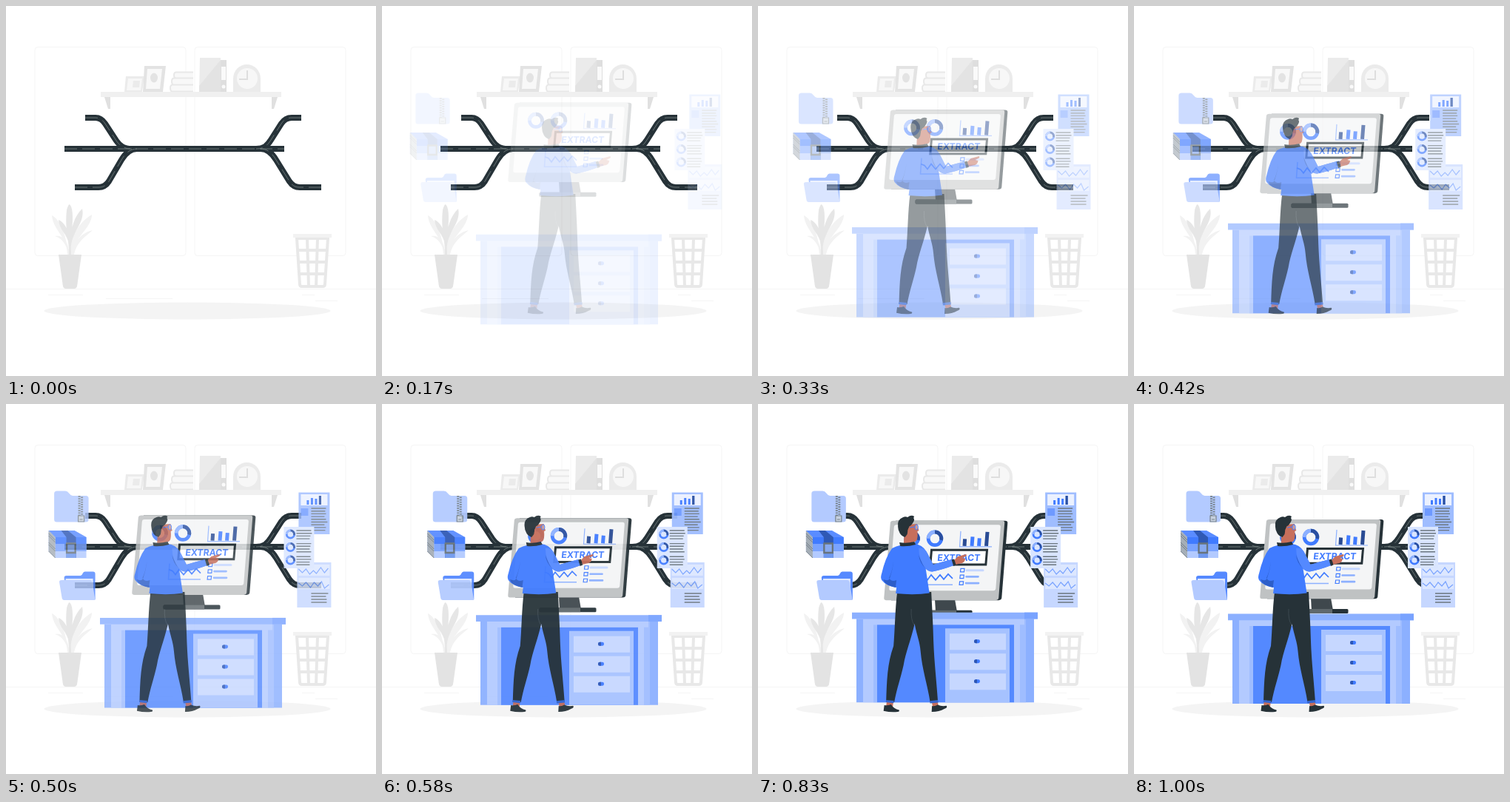
An HTML page for the animation above (1040 ms loop, 500 px wide and 500 px high).

```html
<!DOCTYPE html>
<html lang="en">
<head>
<meta charset="utf-8">
<title>Data extraction</title>
<style>
html, body { margin: 0; width: 100%; height: 100%; overflow: hidden; background: #fff }
svg { display: block; width: 100%; height: 100% }
.line { fill: none; stroke-linecap: butt }
.blue { fill: #407bff }
.dark { fill: #263238 }
.skin { fill: #c76f5b }
.text { fill: none; stroke: #6b767e; stroke-width: 1.4 }
</style>
</head>
<body>
<svg viewBox="0 0 500 500">
<defs>
  <path id="wires" fill="none" d="M79 193H376M107 151h14c5 0 9 2 13 8l15 23c5 7 10 11 21 11M93 245h32c6 0 10-2 14-8l17-29c6-10 12-15 21-15M399 151h-13c-6 0-10 2-14 8l-14 22c-5 8-10 12-20 12M426 245h-29c-6 0-10-2-14-8l-18-29c-6-10-12-15-21-15"/>
  <g id="donut" fill="none" stroke-width="4.6">
    <circle r="8.6" stroke="#407bff"/>
    <path d="M0-8.6A8.6 8.6 0 0 1 8.3 2" stroke="#2a4f9f"/>
    <path d="M-8.6 0A8.6 8.6 0 0 1 0-8.6" stroke="#8cb0ff"/>
  </g>
  <g id="drawer">
    <path d="M259 312h76v22h-76z" fill="#c6d7ff"/>
    <rect x="292" y="320" width="8" height="5" rx="2.3" class="blue"/>
    <path d="M296 320h-1.500a2.500 2.500 0 0 0 0 5h1.500z" fill="#2d56b3"/>
  </g>
</defs>

<!-- Room -->
<g class="line" stroke="#f5f5f5">
  <rect x="39" y="55.5" width="204" height="282" rx="4"/>
  <rect x="255" y="55.5" width="204" height="282" rx="4"/>
  <path d="M0 382.5H500M57 390.5h47M135 395.5h90M400 390.5h17M418 398.5h30"/>
</g>
<g fill="#ebebeb">
  <path d="M162 95h25l-3 21h-24z"/>
  <path d="M165 98h19l-2 16h-19z" fill="#f7f7f7"/>
  <path d="M172 101h9l-1 9h-9z"/>
  <path d="M187 81h29l-4 35h-27z" fill="#e3e3e3"/>
  <path d="M191 85h20l-3 27h-19z" fill="#f8f8f8"/>
  <ellipse cx="200" cy="97" rx="5" ry="6.5" fill="#e3e3e3"/>
  <path d="M253 89.5h-23q-3 0-3 4t3 4h23m0 0h-26q-3 0-3 4.500t3 4.500h26m0 0h-28q-3 0-3 4.500t3 4.500h28" fill="#f8f8f8" stroke="#e8e8e8" stroke-width="2"/>
  <path d="M262 70h28v47h-29z"/>
  <path d="M290 73v44h-29v-9z" fill="#e3e3e3"/>
  <path d="M290 73h8v44h-8z" fill="#dedede"/>
  <path d="M291 82h6v18h-6z" fill="#fafafa"/>
  <circle cx="294" cy="109" r="2.500" fill="#fafafa"/>
  <path d="M307 117V98a18.500 19 0 0 1 37 0v19z"/>
  <circle cx="326" cy="98" r="14" fill="#f7f7f7"/>
  <path d="M326 87v12h-11" class="line" stroke="#dedede" stroke-width="2"/>
  <path d="M128 116h244v7H128z" fill="#f0f0f0"/>
  <path d="M133 123h8v16h-3zM359 123h8l-5 16h-3z" fill="#e0e0e0"/>
</g>
<g fill="#f2f2f2">
  <path d="M83 336C82 310 64 304 62 283c12 6 20 28 22 53zM84 336c-2-14-8-22-18-25 9-2 18 4 20 25zM87 336c-1-25 13-45 29-54 0 18-24 30-27 54zM89 336c2-18 14-30 28-33-7 7-21 14-25 33z"/>
  <path d="M85 336c1-20-6-32-3-60q2-8 4-8 4 4 4 18c0 16-3 28-2 50zM85 322c-2-14-13-19-14-33 8 3 14 14 15 28zM87 320c0-20 6-37 16-46 4 18-12 28-15 50z" fill="#e6e6e6"/>
  <path d="M71 336h31l-6 43q-1 3-4 3H81q-3 0-4-3z" fill="#e3e3e3"/>
  <path d="M393 314h42l-4 62q0 3-3 3h-28q-3 0-3-3zM407 314l2 65M421 314l-2 65M394 330h40M395 346h38M396 362h36" fill="#fff" stroke="#e8e8e8" stroke-width="4"/>
  <path d="M388 308h52v5h-52z"/>
  <ellipse cx="245" cy="412" rx="193.500" ry="11.500" fill="#f4f4f4"/>
</g>

<!-- Cables -->
<use href="#wires" stroke="#263238" stroke-width="8"/>
<use href="#wires" stroke="#84908f" stroke-width=".7" stroke-dasharray="17 7"/>

<!-- Archives -->
<g data-x="-30">
  <path d="M70.500 121q0-3.500 4-3.500h11q3 0 5 3t5 3.500h18q3.500 0 3.500 3.500v28.500q0 3.500-3.500 3.500H74q-3.500 0-3.500-3.500z" fill="#b3caff"/>
  <g class="line" stroke="#77828a">
    <path d="M104.500 124v27M108 125.500v26" stroke-width="3" stroke-dasharray="1.700 1.500"/>
    <path d="M103 151h8v8h-8zM105 156h4" fill="#c6d0df" stroke-width="1.200"/>
  </g>
  <path d="M63 171h35l16 9v28H72l-9-9z" fill="#b3caff"/>
  <path d="M63 171h35l16 9H72z" fill="#5a8cff"/>
  <path d="M72 180h42v9.500H72z" class="blue"/>
  <path d="M72 189.500h42v9.500H72z" fill="#79a3ff"/>
  <path d="M63 171l9 9v28l-9-9z" fill="#a5aeb7"/>
  <path d="M63 175l9 9m-9-6l9 9m-9 0l9 9m-9-6l9 9m-9 0l9 9" class="line" stroke="#66717b" stroke-width=".8"/>
  <path d="M80 171h9l11 9v28H87v-28z" fill="#2f59b5"/>
  <path d="M87 190h13v18H87z" fill="#6e98ef"/>
  <path d="M87.500 188.500h11.500v12.500H87.500z" fill="#87a9ef" stroke="#68747c" stroke-width="2.300"/>
  <path d="M84 235q0-3 3-3h19q2 0 3-3 1-2.500 3-2.500h11q3 0 3 3V264H88z" fill="#5589ff"/>
  <path d="M86 236h37v20H86z" fill="#dce7ff"/>
  <path d="M77.500 241q-.5-3 3-3h38q3 0 3.500 3l4 24H84q-2.500 0-3-3z" fill="#b3caff"/>
</g>

<!-- Reports -->
<g data-x="30">
  <path d="M390 119.500h42V176h-42z" fill="#9fbdff"/>
  <path d="M393 122h36v15h-36z" fill="#ebf1ff"/>
  <path d="M402.500 136v-6M408 136v-9M413.500 136v-8M419 136v-12" class="line" stroke="#407bff" stroke-width="3"/>
  <path d="M419 136v-12" stroke="#2a4f9f" stroke-width="3"/>
  <path d="M393 141h10v10h-10z" fill="#6e9aff"/>
  <path class="text" d="M407 141h20m-20 3.700h19m-19 3.700h20m-20 3.700h18m-18 3.700h20m-20 3.700h22m-22 3.700h18m-18 3.700h20m-20 3.700h19"/>
  <path d="M388 214h46v61h-46z" fill="#c6d7ff"/>
  <path d="M390 217h42v15h-42zM390 235h42v15h-42z" fill="#dce7ff"/>
  <path d="M390 223l5 5 5-5 5 7 5-5 4 4 6-8 5 7 5-6M390 242l5 4 5-5 6 7 5-7 5 5 5-6 4 9 6-5" class="line" stroke="#79a3ff" stroke-width="1.200"/>
  <path class="text" d="M407 256h23m-23 4h20m-20 4h21m-21 4h21"/>
  <path d="M370 166h41v56h-41z" fill="#d9e5ff"/>
  <use href="#donut" transform="translate(379 176) scale(.6)"/>
  <use href="#donut" transform="translate(379 193.500) scale(.6)"/>
  <use href="#donut" transform="translate(379 211) scale(.6)"/>
  <path class="text" d="M387 171h20m-20 3.700h21m-21 3.700h19m-19 3.700h18m-18 6.500h20m-20 3.700h19m-19 3.700h18m-18 3.700h20m-20 6.500h19m-19 3.700h20m-20 3.700h18m-18 3.700h18"/>
</g>

<!-- Monitor -->
<g data-y="-30">
  <path d="M239 262h27l3 17h-29z" fill="#3f484d"/>
  <rect x="212.500" y="277" width="77" height="6" rx="1.500" class="dark"/>
  <path d="M214 277h54v6h-54q-1.500-1-1.500-3t1.500-3z" fill="#60696d"/>
  <path d="M186 156h148q3.500 0 3.300 3l-8 101q-.3 3.300-4 3.300H180z" class="dark"/>
  <path d="M183 156h147q3.500 0 3.200 3l-8 101q-.3 3.300-4 3.300H173q-3 0-2.700-3.300l8.500-101q.2-3 4.200-3z" fill="#bfc2c3"/>
  <path d="M187 161.500h138q3 0 2.800 3l-6.500 83q-.3 3-3.300 3H180q-3 0-2.700-3l6.500-83q.2-3 3.200-3z" fill="#f4f5f6"/>
  <use href="#donut" x="208" y="180"/>
  <use href="#donut" transform="translate(239 180) scale(1.030)"/>
  <g class="line">
    <path d="M274 170l-1.500 21H316" stroke="#8cb0ff" stroke-width="1.200"/>
    <path d="M279 190l.6-9.500M308.500 190l1.500-19" stroke="#294b94" stroke-width="5"/>
    <path d="M289 190l1-12.500M298.500 190l.8-10.500" stroke="#407bff" stroke-width="5"/>
    <path d="M221 221l-1.500 21.500H263" stroke="#8cb0ff" stroke-width="1.500"/>
    <path d="M220 229l5 2 4 5 5-7 6 7 6-7 5 6 6-7 6 6" stroke="#407bff" stroke-width="1.700"/>
    <path d="M274 220.500h5l-.5 4.500h-5zM273.300 229.300h5l-.5 4.500h-5zM272.600 238h5l-.5 4.500h-5z" stroke="#407bff" stroke-width="1.200"/>
    <path d="M282 222.800h22" stroke="#c6d7ff" stroke-width="3" stroke-linecap="round"/>
    <path d="M281.500 231.500h16M281 240.200h17" stroke="#8cb0ff" stroke-width="2.700" stroke-linecap="round"/>
  </g>
  <path d="M234.500 195.500h75l-1.700 19.700h-75z" fill="#fff" stroke="#263238" stroke-width="3"/>
  <text transform="translate(271 210) skewX(-6)" text-anchor="middle" font-family="Inter, 'Open Sans', sans-serif" font-weight="700" font-size="12.200" class="blue">EXTRACT</text>
</g>

<!-- Desk -->
<g data-y="30">
  <path d="M133 292h240v113H133z" fill="#8cb0ff"/>
  <path d="M142 292h19v113h-19zM346 292h8v113h-8z" fill="#b3caff"/>
  <path d="M156 300h5v105h-5zM354 292h8v113h-8z" fill="#9fbdff"/>
  <path d="M161 300h185v105H161z" fill="#5489ff"/>
  <path d="M142 292h218v8H142z" fill="#b3caff"/>
  <path d="M253 305h87v100h-87z" fill="#a6c2ff"/>
  <use href="#drawer"/>
  <use href="#drawer" y="27"/>
  <use href="#drawer" y="54"/>
  <path d="M127 283.500h251v8.800H127z" fill="#8cb0ff"/>
  <path d="M360 283.500h18v8.800h-18z" fill="#79a3ff"/>
</g>

<!-- Presenter -->
<g data-x="30">
  <path class="skin" d="M176 400h9l-1 9h-9zM236 400h8l2 9h-8z"/>
  <path class="dark" d="M172.500 407q4 1 9-1 4 6 11 7.500 1 2-2 2.500-9 1-19-1.200zM237 408q4 1 7.500-1.500 6 2.500 12 1.200 2 2.500-2.500 4-8 4.500-17.500 4.300z"/>
  <path class="dark" d="M190 254h46c1 20 2.500 45 3 67 1 28 4 52 6 82h-10.500c-4-25-11-45-13-69-1-13-5-21-8-37-5 22-12 38-15 56-4 18-9 31-12.500 50h-11c1-30 1.500-52 10-76 2-23 2-49 5-73z"/>
  <path d="M175 400l10.500 1-.5 3.300-10.500-1.300zM234 401.300l11-1.200.4 3.300-11 1.200z" fill="#3565cc"/>
  <path d="M209 277q-1 14 4 22" class="line" stroke="#45525a" stroke-width=".7"/>
  <path class="blue" d="M183 195q10-6 30-6 11 1 16 10 6 11 9.500 18 10-3 25-7l3 8q-16 6-29 8.500-5 0-9-4l5 33q-20 3-45.500.5l1-8q-14-2-20-10-2-4 0-9 5-22 14-34z"/>
  <path d="M219 195q8-2 12 7l7.500 15q10-3 25-7l3 8q-16 6-29 8.500-6 0-10-5-8-9-8.500-26.500z" fill="#5489ff"/>
  <path d="M185 213q-2 14-6 22 3 6 10 3-1 6-1 10-15-3-17-11 8 3 9-2 4-12 5-22zM219 204q5 14 10 19l-1-1q-8-8-9-18z" fill="#2d5ec9"/>
  <path class="skin" d="M202 163l15-1q.5 5 2.300 9l-2 1q.7 8-1 12-2 3.500-5.500 2l1 3-13 1q0-9 1-15z"/>
  <path class="dark" d="M191 166q-1.500-10 7-13 3-1.500 6 0 5-4 9-1l-1 2q2 2-.5 6-3 5-5 5l-2 5-1 6-3 4q-5-2-7-5.500-2.500-4-2.500-8.500z"/>
  <path d="M204.500 170q1-4 4-2.500l-.5 7q-4 1-3.500-4.500z" class="skin"/>
  <path d="M207 167l7-1" stroke="#407bff"/>
  <ellipse cx="216" cy="166.500" rx="2.200" ry="3.600" fill="#e6edff" fill-opacity=".35" stroke="#407bff"/>
  <path class="dark" d="M193 187q9 2 20-1l2 4q-11 3-21 2z"/>
  <path class="skin" d="M267 211l5-5 11-3q1.500 1 0 2.500l-5 2.500 4 1q-1 6-7 6.500l-6 1.500z"/>
  <path class="dark" d="M263.500 210.500l3.500-1 2.500 8-3.500 1.500z"/>
</g>
</svg>
<script>
const groups = [...document.querySelectorAll('[data-x], [data-y]')];
const LOOP = 1040, FRAME = 1000 / 24;

const cubic = (s, a, b) => 3 * (1 - s) ** 2 * s * a + 3 * (1 - s) * s * s * b + s ** 3;

// Eased progress with a small overshoot
function ease(p) {
  let lo = 0, hi = 1;
  for (let i = 0; i < 30; i++) {
    const mid = (lo + hi) / 2;
    if (cubic(mid, .36, .5) < p) lo = mid; else hi = mid;
  }
  return cubic(lo, -.01, 1.38);
}

function draw(now) {
  const step = Math.floor((now % LOOP + 4) / FRAME);
  const v = step < 2 ? 0 : ease(Math.min(1, (step + 1) / 24));
  for (const g of groups) {
    const { x = 0, y = 0 } = g.dataset;
    g.setAttribute('transform', `translate(${x * (1 - v)} ${y * (1 - v)})`);
    g.setAttribute('opacity', Math.max(0, Math.min(1, v)));
  }
}

const start = performance.now();
function tick() {
  draw(performance.now() - start);
  requestAnimationFrame(tick);
}
tick();
</script>
</body>
</html>
```
